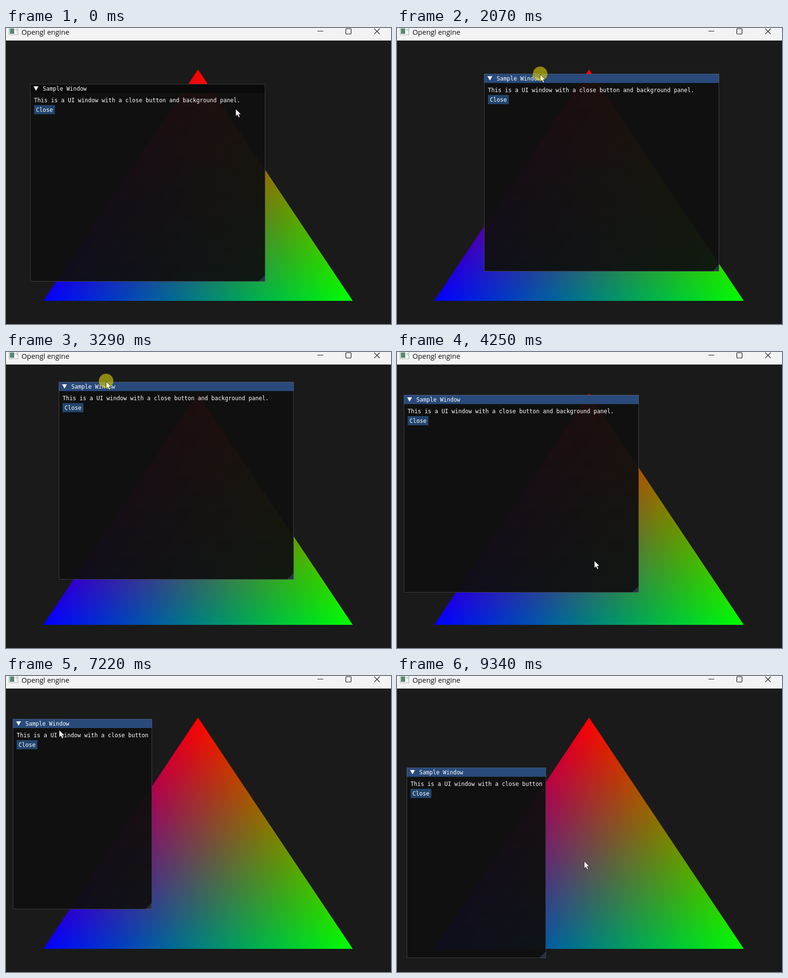
An HTML page with a canvas that plays this animation: 796x614 px, repeating every 9420 ms.

```html
<!DOCTYPE html>
<html lang="en">
<head>
<meta charset="utf-8">
<title>Opengl engine</title>
<style>
  html, body { margin: 0; width: 100%; height: 100%; overflow: hidden; background: #1a1a1a; }
  #stage { position: relative; width: 796px; height: 614px; overflow: hidden; background: #1a1a1a; }
  #stage * { position: absolute; }
  #scene, #caption svg { left: 0; top: 0; }
  #caption { left: 0; top: 0; width: 796px; height: 26px; background: #f3f3f3; }
  #caption span { left: 32px; top: -2px; font: 14.6px/20px "Open Sans", "Noto Sans", sans-serif; color: #111; white-space: pre; }
  #panel {
    left: 0; top: 0; overflow: hidden; background: rgba(15, 15, 15, .94);
    font: 11.627px/13px "DejaVu Sans Mono", "Liberation Mono", monospace; color: #fff; white-space: pre;
  }
  #panel::after { content: ""; position: absolute; inset: 0; border: 1px solid rgba(110, 110, 128, .5); }
  #bar { left: 0; top: 0; width: 100%; height: 19px; background: #0a0a0a; }
  #bar.active { background: #294a7a; }
  #bar span { left: 26px; top: 4px; }
  #halo { left: 3px; top: 1px; width: 17px; height: 17px; border-radius: 50%; background: #4296fa; }
  #arrow { left: 7px; top: 5px; width: 10px; height: 9px; background: #fff; clip-path: polygon(0 0, 100% 0, 50% 100%); }
  .folded #arrow { clip-path: polygon(10% 0, 95% 50%, 10% 100%); }
  #label { left: 8px; top: 28px; }
  #button { left: 8px; top: 44px; width: 43px; height: 19px; background: #23456d; }
  #button span { left: 4px; top: 4px; }
  #grip { right: 0; bottom: 0; width: 14px; height: 14px; clip-path: polygon(100% 0, 100% 100%, 0 100%); }
  .folded #label, .folded #button, .folded #grip { display: none; }
  #press { left: -15px; top: -16px; width: 30px; height: 30px; border-radius: 50%; background: rgba(220, 208, 10, .6); }
  #pointer { left: 0; top: 0; }
  #pointer svg { left: -1px; top: -1px; }
</style>
</head>
<body>
<div id="stage">
  <canvas id="scene" width="796" height="614"></canvas>
  <div id="caption">
    <svg width="796" height="26" fill="none" stroke="#111" stroke-width="1.2">
      <rect x="6.5" y="-2" width="18" height="16" fill="#fafafa" stroke="#a3a9ab" stroke-width="1"/>
      <rect x="8" y="1" width="9" height="11" fill="#568a70" stroke="none"/>
      <path d="M19 3.5h2M22.5 1.5v5" stroke="#8b9692" stroke-width="1"/>
      <path d="M644 6.5h12M761.5 1.5l11 11M772.5 1.5l-11 11"/>
      <rect x="702.5" y="1.5" width="11" height="11" rx="1.5"/>
    </svg>
    <span>Opengl engine</span>
  </div>
  <div id="panel">
    <div id="bar"><div id="halo"></div><div id="arrow"></div><span>Sample Window</span></div>
    <div id="label">This is a UI window with a close button and background panel.</div>
    <div id="button"><span>Close</span></div>
    <div id="grip"></div>
  </div>
  <div id="pointer">
    <div id="press"></div>
    <svg width="16" height="22"><path id="tip" d="M1 1V16.2L4.5 13L7 18.6L9.6 17.4L7.2 12H11.8Z" stroke="#111" stroke-width=".8"/></svg>
  </div>
</div>
<script>
const LOOP = 9420, LAG = 30, CLICK = 70;
const $ = id => document.getElementById(id);
const within = (t, start, end) => t >= start && t < end;

const drag = { start: 1510, end: 3780 };
const resize = { start: 5230, end: 6520 };
const nudge = { start: 8900, end: 9120 };
const focusAt = 1090, foldAt = 7710, unfoldAt = 8290;

// The pointer eases from one resting point to the next.
const home = [475, 168];
const moves = [
  { start: 160, end: 600, to: [230, 122] },
  { start: 810, end: 1370, to: [157, 120] },
  { ...drag, to: [121, 93] },
  { start: 3780, end: 4250, to: [408, 433] },
  { start: 4250, end: 4720, to: [496, 497] },
  { ...resize, to: [298, 482] },
  { start: 6730, end: 7010, to: [110, 112] },
  { start: 7220, end: 7570, to: [26, 98] },
  { start: 8430, end: 8830, to: [60, 105] },
  { ...nudge, to: [66, 206] },
  { start: 9120, end: 9340, to: [387, 384] }
];

// One clockwise sweep over the stage, and one shrink and regrow.
const placeAt = spline([
  [1510, 50, 116], [2070, 180, 95], [2250, 240, 74], [2400, 270, 130],
  [2660, 49, 258], [2860, 190, 400], [3250, 120, 75], [3640, 14, 89]
]);
const sizeAt = spline([[5230, 486, 410], [5500, 358, 292], [5900, 290, 300], [6520, 288, 395]]);

// Smooth curve through points [time, x, y], at rest at both ends.
function spline(keys) {
  const last = keys.length - 1;
  const slope = (i, c) => i === 0 || i === last ? 0
    : (keys[i + 1][c] - keys[i - 1][c]) / (keys[i + 1][0] - keys[i - 1][0]);
  return time => {
    const t = Math.min(Math.max(time, keys[0][0]), keys[last][0]);
    const i = Math.max(1, keys.findIndex(k => k[0] >= t));
    const a = keys[i - 1], b = keys[i], span = b[0] - a[0];
    const u = (t - a[0]) / span, v = 1 - u;
    return [1, 2].map(c =>
      a[c] * v * v * (1 + 2 * u) + b[c] * u * u * (3 - 2 * u)
      + span * u * v * (v * slope(i - 1, c) - u * slope(i, c)));
  };
}

function glide(t) {
  let p = home;
  for (const { start, end, to } of moves) {
    if (t < start) break;
    const u = Math.min(1, (t - start) / (end - start));
    const f = u * u * (3 - 2 * u);
    p = p.map((v, c) => v + (to[c] - v) * f);
  }
  return p;
}

function panelAt(t) {
  const [x, y] = placeAt(t);
  if (t < nudge.start) return [x, y];
  const from = glide(nudge.start), now = glide(Math.min(t, nudge.end));
  return [x + now[0] - from[0], y + now[1] - from[1]];
}

// The panel trails the pointer while it is dragged or resized.
function pointerAt(t) {
  const [x, y] = placeAt(t + LAG), [w, h] = sizeAt(t + LAG);
  if (within(t, drag.start, drag.end)) return [x + 107, y + 4];
  if (within(t, resize.start, resize.end)) return [x + w - 4, y + h - 2];
  return glide(t);
}

function drawTriangle() {
  const g = $("scene").getContext("2d");
  const corners = [[397, 86, "#f00"], [717, 566, "#0f0"], [77, 566, "#00f"]];
  g.fillStyle = "#000";
  g.fillRect(0, 0, 796, 614);
  g.globalCompositeOperation = "lighter";
  corners.forEach(([x, y, color], i) => {
    const [ax, ay] = corners[(i + 1) % 3], [bx, by] = corners[(i + 2) % 3];
    const dx = bx - ax, dy = by - ay;
    const f = ((x - ax) * dx + (y - ay) * dy) / (dx * dx + dy * dy);
    const ramp = g.createLinearGradient(ax + f * dx, ay + f * dy, x, y);
    ramp.addColorStop(0, "#000");
    ramp.addColorStop(1, color);
    g.fillStyle = ramp;
    g.fillRect(0, 0, 796, 614);
  });
  g.globalCompositeOperation = "destination-in";
  g.beginPath();
  corners.forEach(([x, y]) => g.lineTo(x, y));
  g.fill();
}

const moveTo = (el, x, y) => { el.style.transform = `translate(${Math.round(x)}px, ${Math.round(y)}px)`; };

function render(time) {
  const t = time % LOOP;
  const [x, y] = panelAt(t), [w, h] = sizeAt(t), [px, py] = pointerAt(t);
  const folded = within(t, foldAt + CLICK, unfoldAt + CLICK);
  const resizing = within(t, resize.start, resize.end);
  const pressed = [drag, resize, nudge].some(s => within(t, s.start, s.end))
    || [focusAt, foldAt, unfoldAt].some(s => within(t, s, s + CLICK));
  const overGrip = Math.hypot(px - x - w, py - y - h) < 12;
  const panel = $("panel");

  moveTo(panel, x, y);
  panel.style.width = Math.round(w) + "px";
  panel.style.height = (folded ? 19 : Math.round(h)) + "px";
  panel.className = folded ? "folded" : "";
  $("bar").className = t >= focusAt && !folded ? "active" : "";
  $("halo").style.display = Math.hypot(px - x - 11.5, py - y - 9.5) < 8 ? "" : "none";
  $("grip").style.background = resizing ? "#d5d8c8"
    : overGrip ? "rgba(66, 150, 250, .67)" : "rgba(100, 140, 190, .25)";

  moveTo($("pointer"), px, py);
  $("press").style.display = pressed ? "" : "none";
  $("tip").setAttribute("fill", pressed ? "#ffffc4" : "#fff");
}

drawTriangle();
const begin = performance.now();
function tick() {
  render(performance.now() - begin);
  requestAnimationFrame(tick);
}
tick();
</script>
</body>
</html>
```
